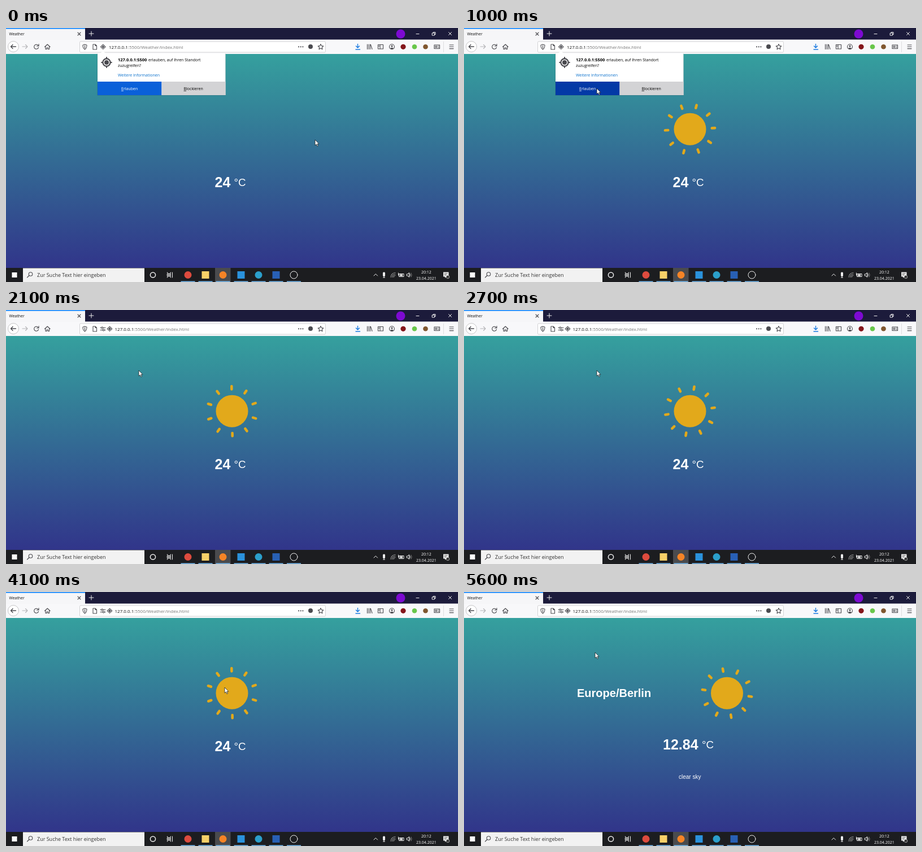
Animation of 800x450 px, one loop 5700 ms. Source, as an HTML page:

```html
<!DOCTYPE html>
<html lang="de">
<head>
<meta charset="utf-8">
<title>Weather</title>
<style>
  html, body { margin: 0; width: 100%; height: 100%; overflow: hidden; }
  svg { display: block; width: 800px; height: 450px; }
  text { font: 7px "Open Sans", "Noto Sans", sans-serif; white-space: pre; }
  .page text { font-family: "Liberation Sans", Arial, sans-serif; fill: #fff; }
  .page .bold { font-weight: bold; }
  .line { fill: none; stroke: #4a4a4f; stroke-width: 1.1; stroke-linecap: round; stroke-linejoin: round; }
  .light { stroke: #eee; stroke-width: 1; }
</style>
</head>
<body>
<svg viewBox="0 0 800 450">
  <defs>
    <linearGradient id="sky" x2="0" y2="1">
      <stop stop-color="#35a09e"/>
      <stop offset="1" stop-color="#31358a"/>
    </linearGradient>
    <g id="target">
      <circle r="2" fill="#4a4a4f"/>
      <path class="line" d="M3.3 0A3.3 3.3 0 1 1 -3.3 0A3.3 3.3 0 1 1 3.3 0M0 -4.4V-3.3M0 4.4V3.3M-4.4 0H-3.3M4.4 0H3.3"/>
    </g>
  </defs>

  <!-- Page -->
  <rect y="46" width="800" height="379" fill="url(#sky)"/>
  <g class="page">
    <g id="sun" fill="#e2a91b" stroke="#e2a91b" stroke-width="4.6" stroke-linecap="round">
      <circle r="28.5" stroke="none"/>
      <g id="rays"></g>
    </g>
    <g id="before">
      <text class="bold" x="369.5" y="282" style="font-size:25px">24</text>
      <text x="403.5" y="279.5" style="font-size:18.75px">°C</text>
    </g>
    <g id="after">
      <text class="bold" x="200" y="186" style="font-size:20px">Europe/Berlin</text>
      <text class="bold" x="352" y="279" style="font-size:25px">12.84</text>
      <text x="421" y="276.5" style="font-size:18.75px">°C</text>
      <text x="380" y="330.5" style="font-size:10px">clear sky</text>
    </g>
  </g>

  <!-- Tab strip -->
  <rect width="800" height="21" fill="#1c1b3b"/>
  <rect width="140" height="21" fill="#f6f6f8"/>
  <rect width="140" height="1.6" fill="#0a84ff"/>
  <text x="5.5" y="13.2" style="font-size:6.9px" fill="#111">Weather</text>
  <path class="line" d="M127 8l5 5m0 -5l-5 5"/>
  <path class="line light" d="M147 10h8m-4 -4v8M726 10.5h5M783.5 7.500l5 5m0 -5l-5 5M754.500 9h4v4h-4zM756 9v-1.500h4v4h-1.500"/>
  <circle cx="698.500" cy="10.500" r="8" fill="#7d0ad2"/>

  <!-- Toolbar -->
  <rect y="20.500" width="800" height="25.500" fill="#f8f8fa"/>
  <circle cx="13" cy="33" r="9.500" fill="#fff" stroke="#b5b5b8" stroke-width=".8"/>
  <path class="line" d="M17.500 33h-9m3.500 -3.500l-3.500 3.500l3.500 3.500" style="stroke-width:1.4"/>
  <path class="line" d="M29 33h9m-3.500 -3.500l3.500 3.500l-3.500 3.500" style="stroke:#b4b4b7"/>
  <path class="line" d="M57 31A4 4 0 1 0 57.500 34.500M58 28.500v3.500h-3.500"/>
  <path class="line" d="M68.500 33.500l4.800 -4.500l4.800 4.500M70 33v4.500h2.200v-2.500h2.200v2.500h2.200v-4.500"/>
  <rect x="130.500" y="24" width="435" height="19" rx="1.500" fill="#fff" stroke="#c8c8cb" stroke-width=".8"/>
  <path class="line" d="M139.500 29l3.500 1.200c0 4 -.7 6 -3.500 7.800c-2.800 -1.800 -3.500 -3.800 -3.500 -7.800zM139.500 31v4.500M154 29h4l2.500 2.500v6.500h-6.500zM158 29v2.500h2.500"/>
  <g id="allowed">
    <path class="line" d="M167 31.500h1.500M172 31.500h4M167 35.500h4M174.500 35.500h1.500"/>
    <circle class="line" cx="170.200" cy="31.500" r="1.500"/>
    <circle class="line" cx="172.800" cy="35.500" r="1.500"/>
  </g>
  <use id="place" href="#target"/>
  <text id="url" y="36.500" style="font-size:8px" fill="#777">
    <tspan fill="#111">127.0.0.1</tspan>:5500/Weather/index.html</text>
  <g fill="#4a4a4f">
    <circle cx="518" cy="33.300" r="1.100"/>
    <circle cx="521.700" cy="33.300" r="1.100"/>
    <circle cx="525.400" cy="33.300" r="1.100"/>
    <circle cx="539" cy="33" r="4"/>
  </g>
  <path class="line" d="M557 28.500l1.400 3.100l3.400 .4l-2.500 2.300l.7 3.400l-3 -1.700l-3 1.700l.7 -3.400l-2.500 -2.300l3.400 -.4z"/>
  <path class="line" d="M622.500 28.500v6.500m-3 -3l3 3l3 -3M619 38h7.500" style="stroke:#1778e0;stroke-width:1.400"/>
  <path class="line" d="M639.500 29v8.500M642 29v8.500M644.500 29v8.500M645.500 29.500l2.500 8M658.500 29.500h9v7.500h-9zM662 29.500v7.500M659.500 32h1.500"/>
  <circle class="line" cx="683" cy="33.300" r="4.500"/>
  <circle cx="683" cy="32" r="1.600" fill="#4a4a4f"/>
  <path d="M680 36a3.500 2.500 0 0 1 6 0a4 4 0 0 1 -6 0" fill="#4a4a4f"/>
  <circle cx="703" cy="33.300" r="4.600" fill="#84161b"/>
  <circle cx="723" cy="33.300" r="4.300" fill="#68c64a"/>
  <circle cx="742.500" cy="33.300" r="4.300" fill="#80572f"/>
  <path class="line" d="M758 30h9.500v6.500h-9.500zM760 32h2.500v2.500h-2.500zM764.500 32h1.500M764.500 34.500h1.500"/>
  <path d="M774.500 24v19" stroke="#d2d2d5" stroke-width=".7"/>
  <path class="line" d="M785 30h7M785 33.300h7M785 36.600h7"/>

  <!-- Permission prompt -->
  <g id="prompt">
    <rect x="161.500" y="45" width="227.500" height="74.500" fill="#222" opacity=".25"/>
    <path d="M162 45h4.500l5 -4.500l5 4.500h212v74h-226.500z" fill="#fff"/>
    <use href="#target" transform="translate(178 61) scale(2)"/>
    <text x="198" y="59.300" style="font-size:7.500px;font-weight:bold">127.0.0.1:5500</text>
    <text x="252" y="59.300">erlauben, auf Ihren Standort</text>
    <text x="198" y="69.300">zuzugreifen?</text>
    <text x="198" y="85.500" fill="#0a70cc">Weitere Informationen</text>
    <rect id="allow" x="162" y="95" width="113.500" height="24"/>
    <rect x="275.500" y="95" width="113" height="24" fill="#d3d3d5"/>
    <text x="204" y="110" fill="#fff"><tspan text-decoration="underline">E</tspan>rlauben</text>
    <text x="314.500" y="110"><tspan text-decoration="underline">B</tspan>lockieren</text>
  </g>

  <!-- Taskbar -->
  <rect y="425" width="800" height="25" fill="#1c1d20"/>
  <rect x="10.500" y="433" width="9" height="9" fill="#fff"/>
  <rect x="30" y="425.500" width="215" height="24.500" fill="#f2f2f2"/>
  <circle class="line" cx="43.500" cy="436" r="3.300"/>
  <path class="line" d="M41 438.500l-3.500 3.500"/>
  <text x="55" y="441.300" style="font-size:9px" fill="#333">Zur Suche Text hier eingeben</text>
  <circle class="line light" cx="260" cy="437.500" r="4.600" style="stroke-width:1.500"/>
  <path class="line light" d="M285.500 433v2h6v-2M285.500 442v-2h6v2M285.500 436.500h6v2h-6zM294.500 433v9"/>
  <rect x="370" y="425" width="27.500" height="25" fill="#4a4b4e"/>
  <g id="apps"></g>
  <circle class="line light" cx="509.500" cy="437.500" r="6.500"/>
  <path class="line light" d="M651 439l3.300 -3.300l3.300 3.300"/>
  <rect x="667" y="432.500" width="4" height="7.500" rx="1.500" fill="#eee"/>
  <path class="line light" d="M669 440v2M667.500 442h3"/>
  <path class="line" d="M681 441.500a8 8 0 0 1 8 -8M683.500 441.500a5.500 5.500 0 0 1 5.500 -5.500M686 441.500a3 3 0 0 1 3 -3" style="stroke:#999"/>
  <path class="line light" d="M696 435.500h8v5h-8zM694.500 434v4"/>
  <rect x="697" y="436.500" width="5" height="3" fill="#eee"/>
  <path class="line light" d="M709.500 436h1.500l2.500 -2.500v8l-2.500 -2.500h-1.500zM715 435.500q1.500 2 0 4"/>
  <path class="line" d="M716.500 434q3 3.500 0 7" style="stroke:#777"/>
  <text x="735" y="434.500" fill="#fff">20:12</text>
  <text x="726" y="446" fill="#fff">23.04.2021</text>
  <path d="M774 432.500h9.500v8h-4l-2.500 2.500v-2.500h-3z" fill="#eee"/>
  <path d="M775.500 435h6M775.500 437.500h4" stroke="#333" stroke-width=".8"/>
  <circle cx="782" cy="441" r="2.800" fill="#333" stroke="#eee" stroke-width=".6"/>

  <path id="cursor" d="M0 0v10l2.300 -2.100l1.600 3.600l1.600 -.7l-1.600 -3.500h3z" fill="#fff" stroke="#111" stroke-width=".7"/>
</svg>
<script>
const $ = id => document.getElementById(id);
const LOOP = 5700, STEP = 100;
const SUN_IN = 100, HOVER = 800, ALLOWED = 1400, LOADED = 4400;

// Pointer path: time, x, y
const path = [
  [100, 547, 198], [450, 400, 152], [800, 235, 107], [2700, 235, 107],
  [3000, 274, 85], [3400, 405, 226], [3800, 395, 180], [4100, 387, 169],
  [4200, 240, 93], [4300, 232, 107]
];

// Taskbar apps: centre, colour, round or square
const apps = [
  [322, '#dd4b3e', 1], [353, '#f7d068', 0], [384, '#f58426', 1], [416, '#2a92dc', 0],
  [447, '#2b9fcb', 1], [478, '#2860b5', 0], [509.5, 'none', 1]
];

$('rays').innerHTML = Array.from({ length: 10 }, (_, i) =>
  `<path d="M0 -38.8v-5.300" transform="rotate(${i * 36})"/>`).join('');
$('apps').innerHTML = apps.map(([x, fill, round]) =>
  `<rect x="${x - 6.5}" y="431" width="13" height="13" rx="${round ? 6.5 : 0}" fill="${fill}"/>
   <rect x="${x - 12.5}" y="448.500" width="25" height="1.500" fill="#76b9ed"/>`).join('');

function pointer(t) {
  const next = path.findIndex(p => p[0] > t);
  if (next < 0) return path.at(-1).slice(1);
  if (!next) return path[0].slice(1);
  const [t0, x0, y0] = path[next - 1], [t1, x1, y1] = path[next];
  const k = (t - t0) / (t1 - t0);
  return [x0 + (x1 - x0) * k, y0 + (y1 - y0) * k];
}

const show = (id, on) => $(id).setAttribute('display', on ? 'inline' : 'none');
const place = (id, x, y) => $(id).setAttribute('transform', `translate(${x} ${y})`);

function draw(t) {
  const allowed = t >= ALLOWED, loaded = t >= LOADED;
  show('sun', t >= SUN_IN);
  place('sun', loaded ? 465.5 : 400, 179.2);
  $('rays').setAttribute('transform', `rotate(${(t - 150) * 0.018})`);
  show('before', !loaded);
  show('after', loaded);
  show('prompt', !allowed);
  show('allowed', allowed);
  place('place', allowed ? 183.5 : 171.8, 33.4);
  $('url').setAttribute('x', allowed ? 192.5 : 182);
  $('allow').setAttribute('fill', t >= HOVER ? '#0339a6' : '#0a60d9');
  place('cursor', ...pointer(t));
}

// Leading whitespace in the address would shift it under white-space: pre
$('url').firstChild.remove();

const start = performance.now();
function tick() {
  const t = (performance.now() - start) % LOOP;
  draw(Math.floor(t / STEP) * STEP);
  requestAnimationFrame(tick);
}
tick();
</script>
</body>
</html>
```
